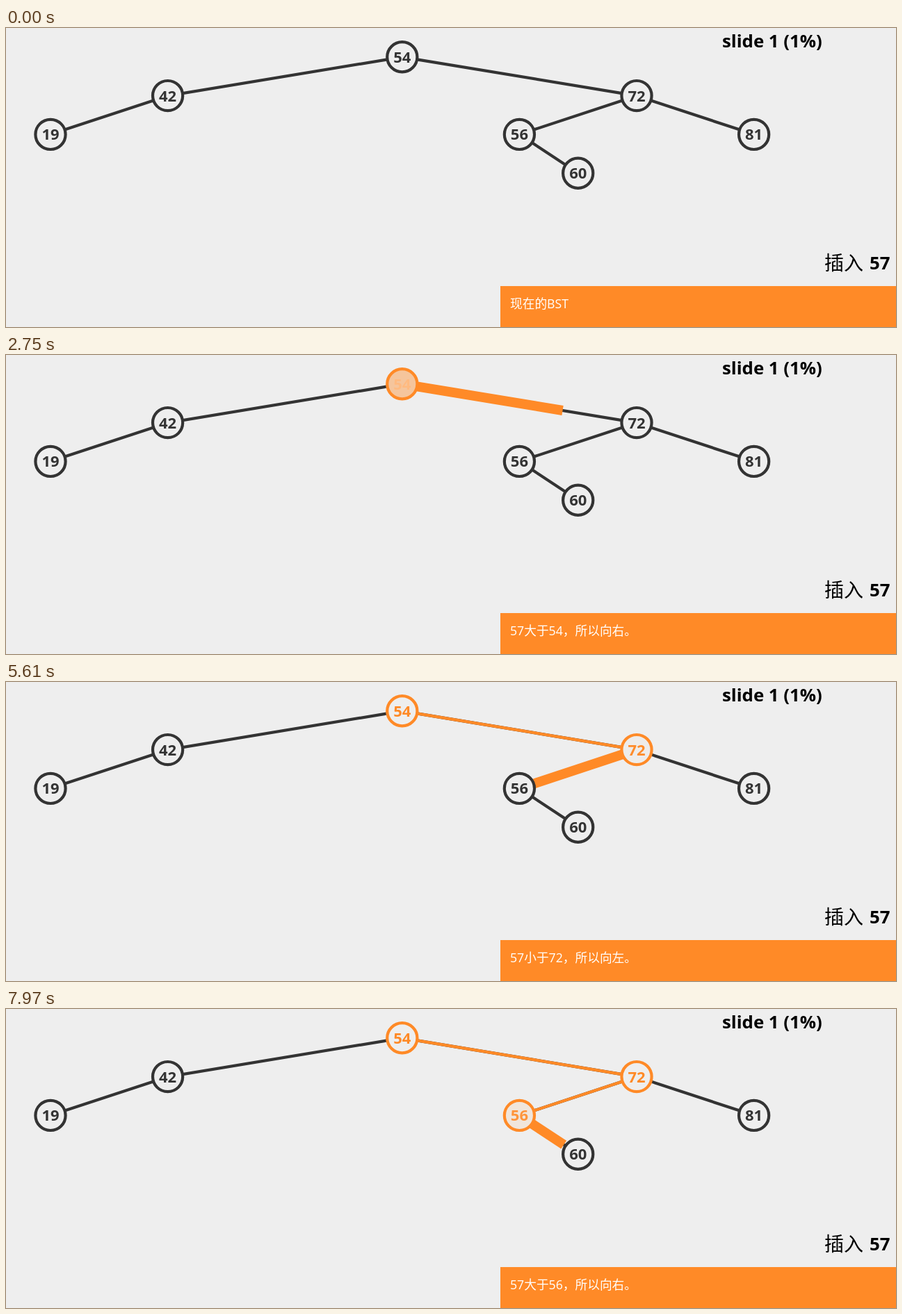
Animation, 1280 px wide and 431 px high, one loop 8000 ms. Source, as an HTML page:

```html
<!DOCTYPE html>
<html lang="zh">
<head>
<meta charset="utf-8">
<title>BST</title>
<style>
  html, body { margin: 0; width: 100%; height: 100%; overflow: hidden; background: #eee; }
  svg { display: block; width: 100%; height: 100%; }
  text { font-family: "Open Sans", "Noto Sans CJK SC", "Noto Sans CJK", sans-serif; }
  .num { font-size: 22px; font-weight: 700; text-anchor: middle; }
  .head { font-size: 25.8px; font-weight: 700; }
  .cjk { font-size: 28px; font-weight: 300; font-family: "Noto Sans CJK SC", "Noto Sans CJK", sans-serif; }
  .status { font-size: 17.7px; fill: #fff; }
</style>
</head>
<body>
<svg viewBox="0 0 1280 431" preserveAspectRatio="none">
  <rect width="1280" height="431" fill="#eee"/>
  <g id="edges"></g>
  <g id="nodes"></g>
  <text class="head" x="1030" y="28">slide 1 (1%)</text>
  <text class="cjk" x="1177" y="349">插入</text>
  <text class="head" x="1242" y="348">57</text>
  <rect x="711" y="372" width="569" height="59" fill="#ff8a27"/>
  <text class="status" id="status" x="725" y="404"></text>
</svg>
<script>
const LOOP = 8000, GROW = 1150, SHRINK = 200;
const THIN = 4.2, THICK = 14, RADIUS = 21.6;
const DARK = [51, 51, 51], PAPER = [238, 238, 238], ORANGE = [255, 138, 39], WHITE = [255, 255, 255];

// value: [column, level]
const tree = { 54: [0, 0], 42: [-4, 1], 72: [4, 1], 19: [-6, 2], 56: [2, 2], 81: [6, 2], 60: [3, 3] };
const links = [[54, 42], [54, 72], [42, 19], [72, 56], [72, 81], [56, 60]];

// compare / descend: start times of both halves of each visit
const visits = [
  { at: 54, to: 72, compare: 860, descend: 2080 },
  { at: 72, to: 56, compare: 3360, descend: 4600 },
  { at: 56, to: 60, compare: 5860, descend: 7090 }
];

const clamp = v => Math.min(1, Math.max(0, v));
const lerp = (a, b, p) => a + (b - a) * p;
const ease = v => (v = clamp(v), v < 0.5 ? 4 * v ** 3 : 1 - 4 * (1 - v) ** 3);
const mix = (a, b, p) => a.map((v, i) => lerp(v, b[i], p));
const rgb = c => `rgb(${c.map(Math.round)})`;
const pos = key => ({ x: 569.8 + tree[key][0] * 84.3, y: 41.8 + tree[key][1] * 55.8 });

function add(parent, tag, attrs) {
  const el = document.createElementNS("http://www.w3.org/2000/svg", tag);
  set(el, attrs);
  return document.getElementById(parent).appendChild(el);
}

function set(el, attrs) {
  for (const k in attrs) el.setAttribute(k, attrs[k]);
}

// ends of a link on the rims of its two circles
function span(from, to) {
  const a = pos(from), b = pos(to);
  const cut = RADIUS / Math.hypot(b.x - a.x, b.y - a.y);
  return {
    x1: lerp(a.x, b.x, cut), y1: lerp(a.y, b.y, cut),
    x2: lerp(b.x, a.x, cut), y2: lerp(b.y, a.y, cut)
  };
}

for (const [from, to] of links)
  add("edges", "line", { ...span(from, to), stroke: rgb(DARK), "stroke-width": THIN });

for (const v of visits) {
  v.span = span(v.at, v.to);
  v.line = add("edges", "line", { ...v.span, stroke: rgb(ORANGE) });
}

const nodes = {};
for (const key in tree) {
  const { x, y } = pos(key);
  nodes[key] = {
    ring: add("nodes", "circle", { cx: x, cy: y, r: RADIUS, "stroke-width": THIN }),
    label: add("nodes", "text", { class: "num", x, y: y + 7.9 })
  };
  nodes[key].label.textContent = key;
  paint(key, DARK, PAPER, DARK);
}

function paint(key, rim, fill, ink) {
  set(nodes[key].ring, { stroke: rgb(rim), fill: rgb(fill) });
  set(nodes[key].label, { fill: rgb(ink) });
}

function drawVisit(v, t) {
  let on = ease((t - v.compare - 20) / GROW);
  if (on < 0.1) on = 0;
  const off = ease((t - v.descend - 60) / GROW);
  paint(v.at,
    mix(DARK, ORANGE, on),
    mix(mix(PAPER, ORANGE, on), PAPER, off),
    mix(mix(DARK, WHITE, on), ORANGE, off));

  const grown = ease((t - v.descend) / GROW);
  const thinned = ease((t - v.descend - GROW) / SHRINK);
  set(v.line, {
    x2: lerp(v.span.x1, v.span.x2, grown),
    y2: lerp(v.span.y1, v.span.y2, grown),
    "stroke-width": lerp(THICK, THIN, thinned),
    visibility: grown > 0 ? "visible" : "hidden"
  });
}

function message(t) {
  const v = visits.filter(v => t >= v.compare).pop();
  if (!v) return "现在的BST";
  if (t < v.descend) return `将57与${v.at}进行比较`;
  return 57 > v.at ? `57大于${v.at}，所以向右。` : `57小于${v.at}，所以向左。`;
}

const status = document.getElementById("status");
function draw(t) {
  for (const v of visits) drawVisit(v, t);
  const text = message(t);
  if (status.textContent !== text) status.textContent = text;
}

const begin = performance.now();
function tick() {
  draw((performance.now() - begin) % LOOP);
  requestAnimationFrame(tick);
}
tick();
</script>
</body>
</html>
```
